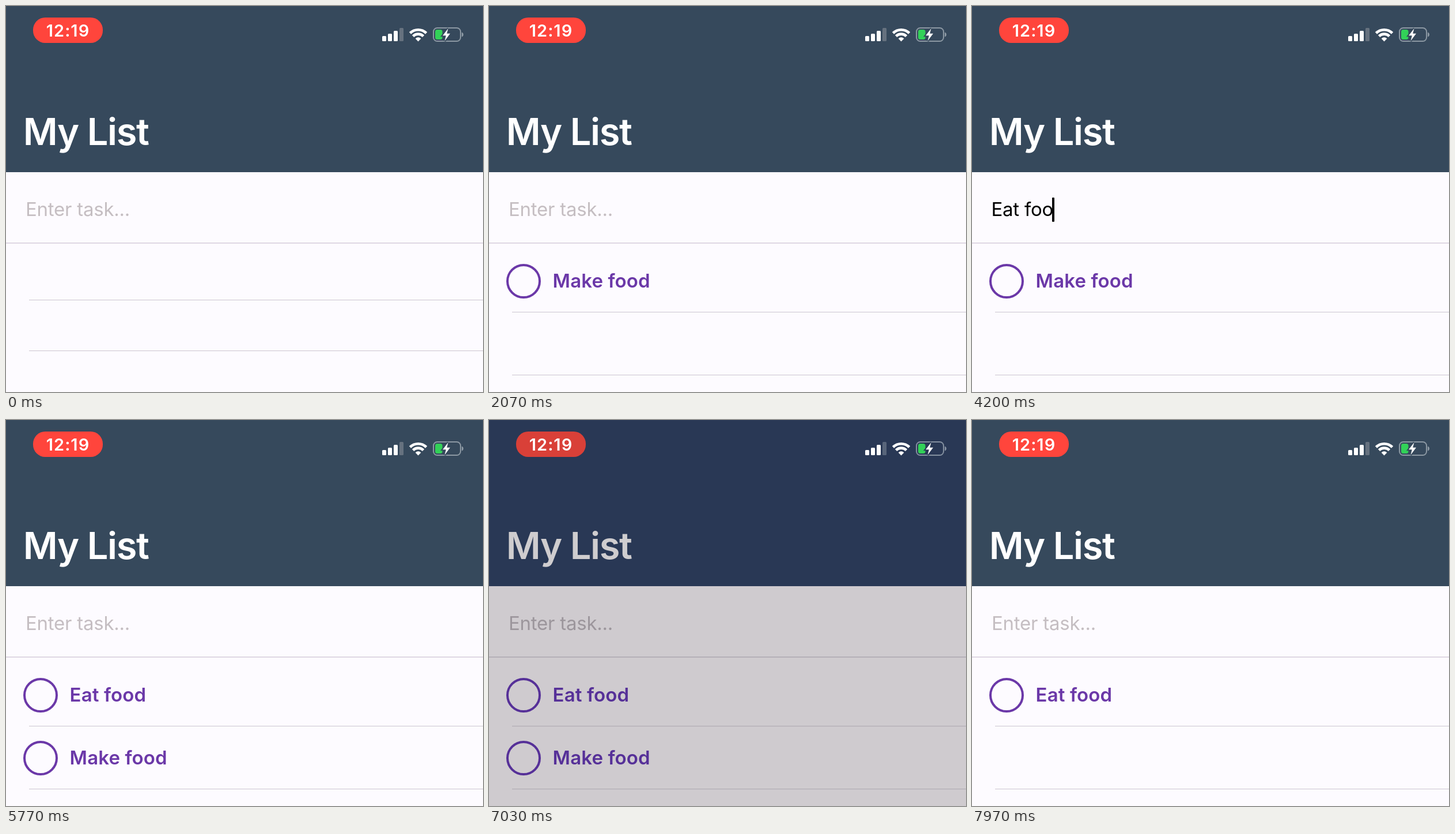
An HTML page that plays this animation: 828x669 px, repeating every 8 s.

```html
<!DOCTYPE html>
<html lang="en">
<head>
<meta charset="utf-8">
<title>My List</title>
<style>
  html, body { margin: 0; width: 100%; height: 100%; overflow: hidden; background: var(--paper); }
  svg { display: block; width: 828px; height: 669px; }
  text { font-family: Inter, Roboto, sans-serif; white-space: pre; }
  .header { fill: var(--header); }
  .pill { fill: var(--pill); }
  .time { font-size: 29px; font-weight: 600; letter-spacing: 1px; fill: #fff; text-anchor: middle; }
  .title { font-size: 65px; font-weight: 600; letter-spacing: -1.4px; fill: var(--title); }
  .field { font-size: 33px; letter-spacing: -.25px; }
  #hint { fill: var(--hint); }
  .item circle { fill: none; stroke: var(--ink); stroke-width: 4; }
  .item text { font-size: 33px; font-weight: 600; letter-spacing: .12px; fill: var(--ink); }
  .weak { fill: var(--weak); }
  .case { fill: none; stroke: var(--case); stroke-width: 2; }
  .rule { fill: var(--rule); }
  .divider { fill: var(--divider); }
</style>
</head>
<body>
<svg viewBox="0 0 828 669">
  <rect class="header" width="828" height="288"/>
  <rect class="pill" x="47" y="20" width="121" height="44" rx="21"/>
  <text class="time" x="107.5" y="53">12:19</text>

  <g fill="#fff">
    <rect x="653" y="52" width="7" height="9" rx="1.5"/>
    <rect x="663" y="48" width="7" height="13" rx="1.5"/>
    <rect x="673" y="43" width="7" height="18" rx="1.5"/>
    <rect class="weak" x="683" y="38" width="7" height="23" rx="1.5"/>
    <path d="M715.5 61.5 L710.6 56.4 Q715.5 52.2 720.4 56.4 Z"/>
  </g>
  <g fill="none" stroke="#fff" stroke-width="4.6">
    <path d="M701.4 47 A20 20 0 0 1 729.6 47"/>
    <path d="M706.5 52.3 A12.8 12.8 0 0 1 724.5 52.3"/>
  </g>

  <rect class="case" x="742" y="38" width="47" height="23" rx="6.5"/>
  <path d="M791 45.5 Q794 46.5 794 49.5 T791 53.5 Z" style="fill:var(--case)"/>
  <rect x="745" y="41" width="12.5" height="17" rx="3.5" fill="#32d158"/>
  <path d="M767.5 39 L758 51.3 H763.8 L761.5 60.5 L771 47.8 H765.2 Z" fill="#fff"
        style="stroke:var(--header);stroke-width:4;paint-order:stroke"/>

  <text class="title" x="29.8" y="241">My List</text>

  <text id="hint" class="field" x="34" y="364">Enter task...</text>
  <text id="typed" class="field" x="33.5" y="364"></text>
  <rect id="caret" y="332" width="4" height="42" rx="1"/>

  <rect class="rule" y="410" width="828" height="1.6"/>
  <rect id="line1" class="divider" x="40" width="788" height="1.1"/>
  <rect id="line2" class="divider" x="40" width="788" height="1.1"/>

  <g id="make" class="item"><circle cx="60" r="28"/><text x="110.6" y="11">Make food</text></g>
  <g id="eat" class="item"><circle cx="60" r="28"/><text x="110.6" y="11">Eat food</text></g>
</svg>
<script>
  const LOOP = 8000, ROW = 109, FIRST_ROW = 477;
  const $ = id => document.getElementById(id);
  const [hint, typed, caret, line1, line2, make, eat] =
    ['hint', 'typed', 'caret', 'line1', 'line2', 'make', 'eat'].map($);

  const entries = [
    { text: 'Make food', focus: 130, start: 370, pace: 145, submit: 1720 },
    { text: 'Eat food', focus: 2820, start: 3250, pace: 150, submit: 4800 }
  ];

  // Normal colour and colour behind the confirmation dim
  const palette = {
    header: ['#36495c', '#293855'],
    paper: ['#fdfbff', '#cfcbcf'],
    title: ['#ffffff', '#cfcdcf'],
    pill: ['#ff453c', '#d94038'],
    hint: ['#c5bec2', '#9c969c'],
    ink: ['#6b38a8', '#563098'],
    weak: ['#66727f', '#58657a'],
    case: ['#8c98a3', '#8490a0'],
    rule: ['#d8d0dc', '#aeaab2'],
    divider: ['#cfc8d2', '#aeaab2']
  };

  const mix = (a, b, k) => a + (b - a) * k;
  const ease = (t, from, to) => {
    const k = Math.min(1, Math.max(0, (t - from) / (to - from)));
    return k * k * (3 - 2 * k);
  };
  const channels = hex => [1, 3, 5].map(i => parseInt(hex.slice(i, i + 2), 16));
  const blend = (a, b, k) => {
    const end = channels(b);
    return `rgb(${channels(a).map((v, i) => Math.round(mix(v, end[i], k)))})`;
  };

  function place(row, y, opacity) {
    row.setAttribute('transform', `translate(0 ${y})`);
    row.setAttribute('opacity', opacity);
  }

  function drawField(t) {
    const entry = entries.find(e => t >= e.focus && t < e.submit);
    const count = entry ? Math.max(0, Math.floor((t - entry.start) / entry.pace) + 1) : 0;
    const value = entry ? entry.text.slice(0, count) : '';
    if (typed.textContent !== value) typed.textContent = value;
    hint.style.display = value ? 'none' : '';
    caret.style.display = entry ? '' : 'none';
    caret.setAttribute('x', value ? 31.5 + typed.getComputedTextLength() : 34);
  }

  function drawList(t) {
    const grow = ease(t, 1720, 2030);
    const shift = ease(t, 4800, 5130);
    const remove = ease(t, 7540, 7860);
    line1.setAttribute('y', mix(509, 530, grow));
    line2.setAttribute('y', mix(597, 639, grow));
    place(make, mix(FIRST_ROW - 10, FIRST_ROW, grow) + ROW * shift, grow * (1 - remove));
    place(eat, FIRST_ROW, shift);
  }

  function drawColours(t) {
    const dim = ease(t, 6600, 7000) - ease(t, 7350, 7700);
    const style = document.documentElement.style;
    for (const [name, [normal, dimmed]] of Object.entries(palette))
      style.setProperty('--' + name, blend(normal, dimmed, dim));
  }

  function frame() {
    const t = performance.now() % LOOP;
    drawField(t);
    drawList(t);
    drawColours(t);
    requestAnimationFrame(frame);
  }
  frame();
</script>
</body>
</html>
```
